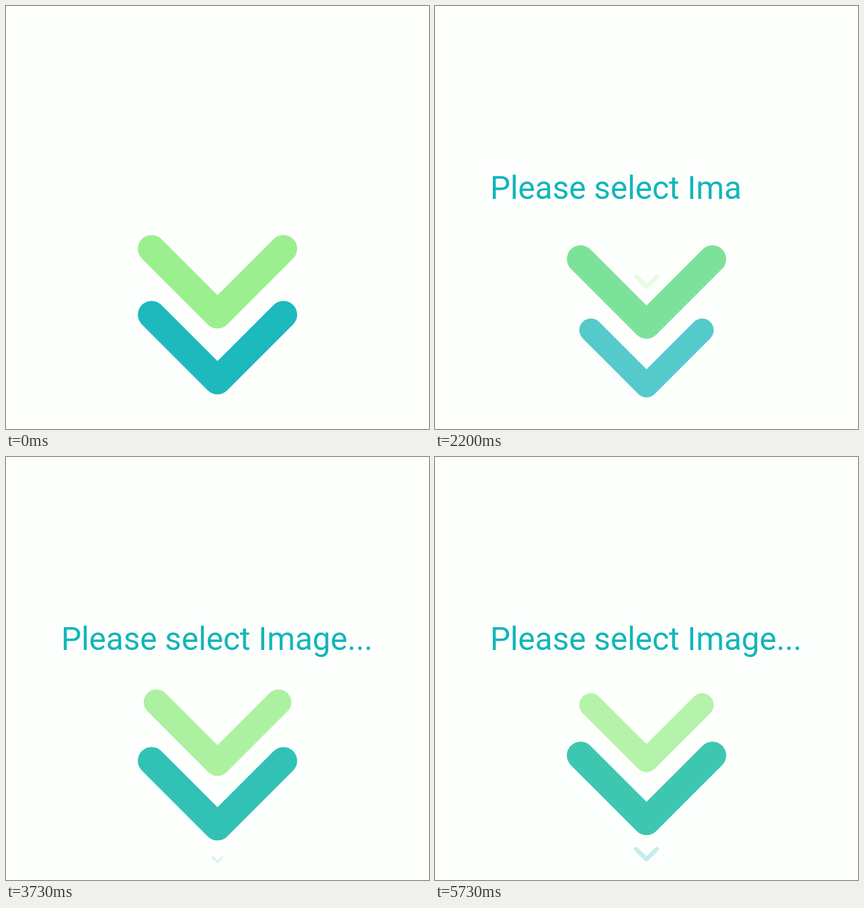
Recreate the animation shown at these times as an HTML page. Size 629 by 629 pixels, loop 5760 ms.

```html
<!DOCTYPE html>
<html lang="en">
<head>
<meta charset="utf-8">
<title>Please select Image</title>
<style>
  html, body { margin: 0; width: 100%; height: 100%; overflow: hidden; background: #fdfffd; }
  svg { display: block; width: 100%; height: 100%; }
  text { font: 400 47.6px Roboto, sans-serif; fill: #14b5b9; white-space: pre; }
  path { fill: none; stroke-width: 41; stroke-linecap: round; stroke-linejoin: round; }
</style>
</head>
<body>
<svg viewBox="0 0 629 629">
  <text id="label" x="82" y="286.5"></text>
  <path id="growing" d="M-98-49L0 49L98-49"/>
  <path id="moving" d="M-98-49L0 49L98-49"/>
  <path id="shrinking" d="M-98-49L0 49L98-49"/>
</svg>
<script>
const LOOP = 5760;
const MESSAGE = 'Please select Image...';
const CHAR_TIME = 125;
const STEP_TIME = 80.6;
const STEPS = 12;
const GREEN = [156, 239, 142];
const TEAL = [29, 185, 189];
const CENTER_X = 314.5;
const TOP = 410;
const TRAVEL = 98;

const [label, growing, moving, shrinking] =
  ['label', 'growing', 'moving', 'shrinking'].map(id => document.getElementById(id));

const smooth = t => t * t * (3 - 2 * t);
const mix = (a, b, t) => `rgb(${a.map((v, i) => Math.round(v + (b[i] - v) * t))})`;

function place(chevron, y, scale, color, opacity) {
  chevron.setAttribute('transform', `translate(${CENTER_X} ${y}) scale(${scale})`);
  chevron.setAttribute('stroke', color);
  chevron.setAttribute('opacity', opacity);
  chevron.setAttribute('visibility', scale > 0 ? 'visible' : 'hidden');
}

// Chevrons advance in discrete steps; after three cycles the last step is held twice as long.
function stepAt(time) {
  const n = Math.floor((time + 5) / STEP_TIME);
  const early = 3 * STEPS;
  return n < early ? n % STEPS : Math.min((n - early) % (STEPS + 1), STEPS - 1);
}

function render(time) {
  const linear = stepAt(time) / STEPS;
  const eased = smooth(linear);
  const shift = TRAVEL * eased;
  place(growing, TOP, eased, mix(GREEN, GREEN, 0), linear);
  place(moving, TOP + shift, 1, mix(GREEN, TEAL, linear), 1);
  place(shrinking, TOP + TRAVEL + shift, 1 - eased, mix(TEAL, TEAL, 0), 1 - linear);
  label.textContent = MESSAGE.slice(0, Math.floor((time + 8) / CHAR_TIME));
}

const start = performance.now();
function frame() {
  render((performance.now() - start) % LOOP);
  requestAnimationFrame(frame);
}
frame();
</script>
</body>
</html>
```
